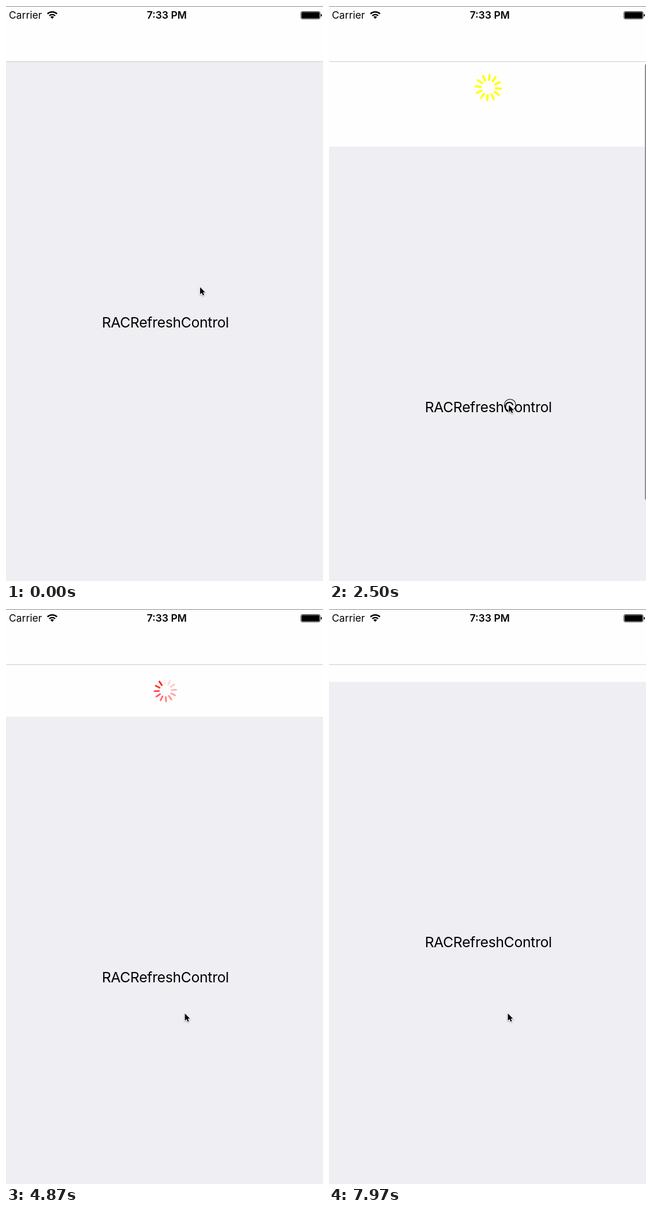
Write an HTML page that moves like this. It is 552 px wide and 998 px high and loops after 8 s.

```html
<!DOCTYPE html>
<html lang="en">
<head>
<meta charset="utf-8">
<title>Pull to refresh</title>
<style>
  html, body { margin: 0; width: 100%; height: 100%; overflow: hidden; background: #fefefe; }
  svg { display: block; width: 100vw; height: 100vh; font-family: Inter, Roboto, sans-serif; }
  #label { font-size: 24.8px; letter-spacing: -0.012em; }
  .status { font-size: 17.6px; }
</style>
</head>
<body>
<svg viewBox="0 0 552 998">
  <rect width="552" height="998" fill="#fefefe"/>
  <g id="spinner" stroke-width="3" stroke-linecap="round"></g>

  <g id="content">
    <rect y="97" width="552" height="901" fill="#eeeef3"/>
    <text id="label" x="277.5" y="558" text-anchor="middle">RACRefreshControl</text>
  </g>

  <rect id="scrollbar" x="550" y="101" width="4" rx="2" fill="#8e8e91"/>

  <g id="navbar">
    <rect width="552" height="96" fill="#fefefe"/>
    <rect y="96" width="552" height="1" fill="#cdcdd0"/>
    <rect width="552" height="1" fill="#8a8a8a"/>
    <text class="status" x="5" y="22">Carrier</text>
    <text class="status" x="280" y="22" text-anchor="middle" font-weight="600">7:33 PM</text>
    <g fill="none" stroke="#000" stroke-width="2.4">
      <path d="M72.2 13.7a11.8 11.8 0 0 1 16.6 0"/>
      <path d="M75.4 17a7.2 7.2 0 0 1 10.2 0"/>
      <path d="M77.4 19a4.4 4.4 0 0 1 6.2 0L80.5 22.2Z" fill="#000" stroke="none"/>
    </g>
    <rect x="513.5" y="9.5" width="33.5" height="13" rx="2.5" fill="none" stroke="#444"/>
    <rect x="514.6" y="10.6" width="31.3" height="10.8" rx="1.5"/>
    <path d="M548.2 13.5q2 .5 2 2.5t-2 2.5z"/>
  </g>

  <g id="pointer">
    <circle id="touch" cx="2" r="10" fill="none" stroke="#000" stroke-width="1.1"/>
    <path d="M0 0V12.4L2.9 9.8 4.9 14.2 7 13.3 5.1 9H8.8Z"
          stroke="#fff" stroke-width="2" stroke-linejoin="round" paint-order="stroke"
          style="filter: drop-shadow(0 1px 1px #0005)"/>
  </g>
</svg>
<script>
const LOOP = 8000, START = 280, TICK = 147.5;   // the picture advances in ticks
const PRESS = 3, TRIGGER = 15, RELEASE = 17, SETTLED = 19, FINISH = 50;
const CONTROL_HEIGHT = 90, SPOKES = 12, VIEW_HEIGHT = 998;

const $ = id => document.getElementById(id);
const set = (node, attrs) => {
  for (const name in attrs) node.setAttribute(name, attrs[name]);
};
const lerp = (a, b, p) => a + (b - a) * p;
const phase = (t, from, to) => Math.min(1, Math.max(0, (t - from) / (to - from)));
const easeInOut = p => p * p * (3 - 2 * p);
const easeOut = p => 1 - (1 - p) ** 1.93;

const rest = { x: 338, y: 488 }, press = { x: 324, y: 297 }, release = { x: 311.5, y: 702 };

function pointerAt(tick) {
  if (tick < PRESS) {
    const p = easeInOut(phase(tick, -1, PRESS));
    return { x: lerp(rest.x, press.x, p), y: lerp(rest.y, press.y, p) };
  }
  const p = phase(tick, PRESS, RELEASE);
  return { x: lerp(press.x, release.x, p), y: lerp(press.y, release.y, easeOut(p)) };
}

const rubberBand = distance =>
  VIEW_HEIGHT * (1 - 1 / (distance * 0.55 / VIEW_HEIGHT + 1));

function contentOffset(tick) {
  if (tick < PRESS) return 0;
  if (tick < TRIGGER) return rubberBand(pointerAt(tick).y - press.y);
  const held = lerp(147, CONTROL_HEIGHT, easeInOut(phase(tick, TRIGGER, SETTLED)));
  return held * (1 - easeInOut(phase(tick, FINISH + 0.5, FINISH + 2.93)));
}

const spokes = Array.from({ length: SPOKES }, (_, i) => {
  const spoke = document.createElementNS('http://www.w3.org/2000/svg', 'line');
  set(spoke, { y1: -11.2, y2: -18.8, transform: `rotate(${i * 360 / SPOKES})` });
  return $('spinner').appendChild(spoke);
});

// While pulling, spokes appear one by one; then they spin, redden and fade into a trail.
function drawSpinner(tick, offset) {
  const spinning = tick >= TRIGGER;
  const progress = phase(tick, TRIGGER, TRIGGER + 10);
  const shown = Math.floor((offset - CONTROL_HEIGHT) / 7.5);
  const lag = 10 * easeInOut(phase(tick, TRIGGER, SETTLED));
  const angle = spinning ? 28.2 * (tick - TRIGGER) - 115 - lag : 0;
  const pop = spinning ? 0.18 * (1 - phase(tick, TRIGGER, RELEASE)) : 0;
  const scale = (1 + pop) * (1 - phase(tick, FINISH, FINISH + 2));
  set($('spinner'), {
    transform: `translate(277.5 141.5) rotate(${angle}) scale(${scale})`,
    stroke: `rgb(255, ${lerp(255, 42, progress)}, ${lerp(0, 42, progress)})`
  });
  spokes.forEach((spoke, i) => {
    const trail = (SPOKES - i) % SPOKES / SPOKES;
    set(spoke, { opacity: spinning ? 1 - trail * progress : +(i < shown) });
  });
}

function draw(time) {
  const tick = Math.max(-1, Math.floor((time - START) / TICK));
  const offset = contentOffset(tick);
  const pointer = pointerAt(tick);
  set($('content'), { transform: `translate(0 ${offset})` });
  drawSpinner(tick, offset);
  set($('scrollbar'), {
    height: 903 - offset,
    opacity: tick < TRIGGER ? 0 : 1 - phase(tick, SETTLED + 1, SETTLED + 3)
  });
  set($('pointer'), { transform: `translate(${pointer.x} ${pointer.y})` });
  set($('touch'), { opacity: +(tick >= PRESS && tick < RELEASE) });
}

const begin = performance.now();
function frame() {
  draw((performance.now() - begin) % LOOP);
  requestAnimationFrame(frame);
}
frame();
</script>
</body>
</html>
```
